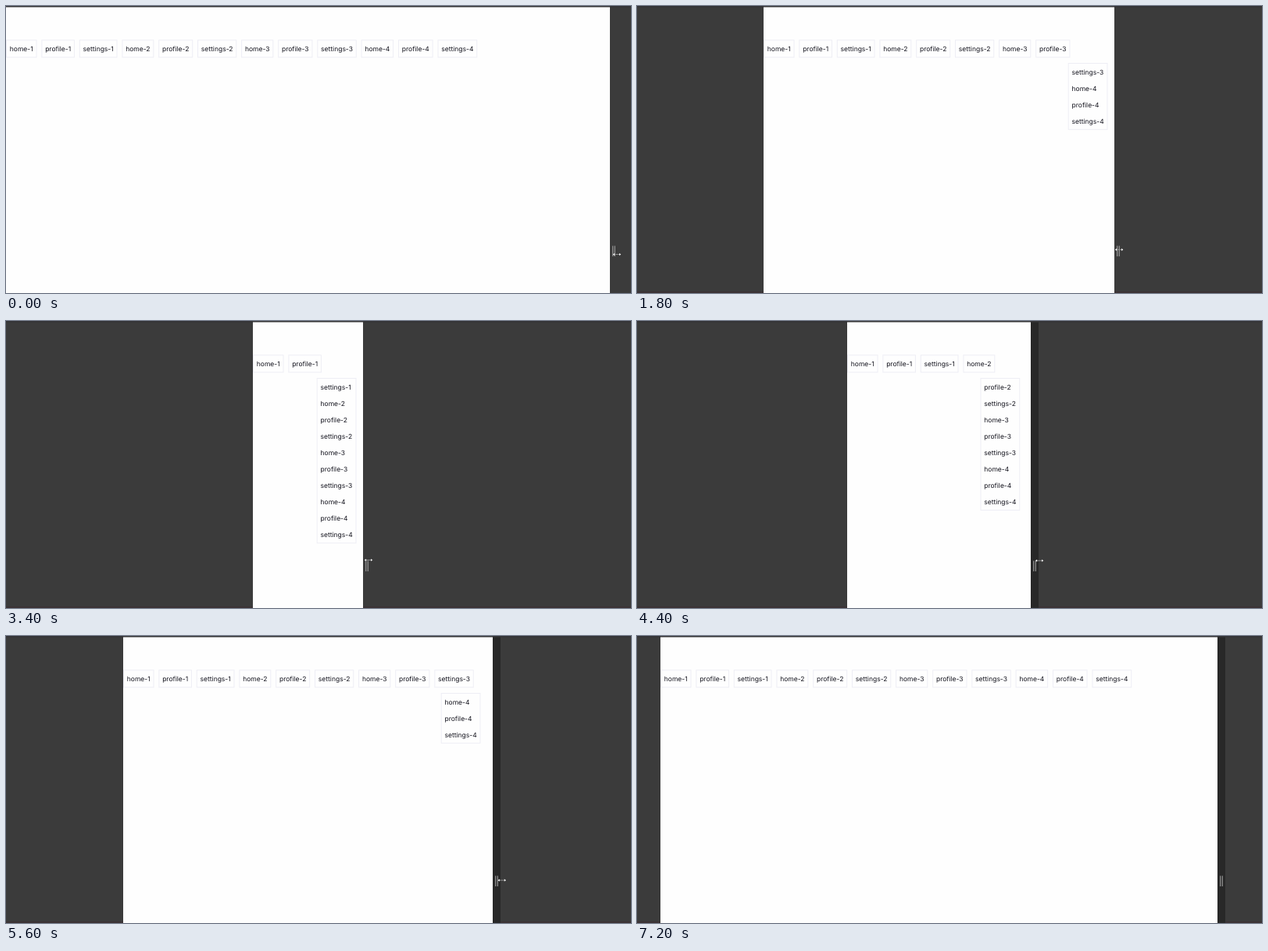
Recreate the animation shown at these times as an HTML page with a canvas. Size 800 by 368 pixels, loop 7800 ms.

```html
<!DOCTYPE html>
<html lang="en">
<head>
<meta charset="utf-8">
<title>Overflowing tab bar</title>
<style>
html, body { margin: 0; width: 100%; height: 100%; overflow: hidden; background: #3b3b3b; }
canvas { display: block; }
</style>
</head>
<body>
<canvas id="stage" width="800" height="368"></canvas>
<script>
const ctx = document.getElementById('stage').getContext('2d');
const LOOP = 7800, STEP = 100;
const CENTER = 386.5, NARROWEST = 322;
const PAD = 4.8, GAP = 5.87, ROW = 21.08, MARGIN = 8.5;

// Left edge of the panel as [time, x]; the right edge mirrors it.
const drag = [[500, 0], [1100, 79], [2400, 234], [3400, 316], [3600, NARROWEST],
  [3800, NARROWEST], [5100, 208], [6200, 79.5], [6800, 30]];

const labels = [1, 2, 3, 4].flatMap(n => ['home', 'profile', 'settings'].map(name => `${name}-${n}`));

function leftAt(t) {
  const next = drag.findIndex(([time]) => t < time);
  if (next === 0) return drag[0][1];
  if (next < 0) return drag[drag.length - 1][1];
  const [t0, a] = drag[next - 1], [t1, b] = drag[next];
  return a + (b - a) * (t - t0) / (t1 - t0);
}

function fill(color, x, y, w, h) {
  ctx.fillStyle = color;
  ctx.fillRect(x, y, w, h);
}

function box(x, y, w, h) {
  ctx.strokeStyle = '#eeeef5';
  ctx.strokeRect(x + .5, y + .5, w - 1, h - 1);
}

function label(text, x, y) {
  ctx.fillStyle = '#15151f';
  ctx.fillText(text, x, y);
}

const widthOf = text => ctx.measureText(text).width;

function drawTabs(left, right, lag) {
  let x = left, shown = 0;
  for (const text of labels) {
    const w = widthOf(text) + 2 * PAD;
    if (x + w > right - MARGIN) break;
    box(x, 43.3, w, 23);
    label(text, x + PAD, 58.2);
    x += w + GAP;
    shown++;
  }
  const rest = labels.slice(shown);
  if (!rest.length) return;
  const w = Math.max(...rest.map(widthOf)) + 2 * PAD;
  const menuX = right - MARGIN - lag - w;
  box(menuX, 73, w, rest.length * ROW + 1.5);
  rest.forEach((text, i) => label(text, menuX + PAD, 87.7 + i * ROW));
}

function drawCursor(x, y) {
  fill('#8c8c8c', x - 4, y - .5, 8, 1);
  ctx.fillStyle = '#fff';
  for (const side of [-1, 1]) {
    ctx.beginPath();
    ctx.moveTo(x + side * 5.2, y);
    ctx.lineTo(x + side * 3, y - 1.6);
    ctx.lineTo(x + side * 3, y + 1.6);
    ctx.fill();
  }
}

function draw(now) {
  const t = Math.floor(now / STEP) * STEP % LOOP;
  const x = leftAt(t), speed = x - leftAt(t - STEP);
  const left = Math.round(x), right = 2 * CENTER - left;
  const grip = right + 5;

  fill('#3b3b3b', 0, 0, 800, 368);
  fill('#333336', 0, 0, 800, 1.5);
  if (t >= 600) fill('#3b3335', 0, 366, 800, 2);
  if (t >= 3900) fill('#282828', grip - 5, 1.5, 10, 366.5);
  fill('#fefefe', left, 1.5, right - left, 366.5);

  ctx.font = '8.5px Inter, sans-serif';
  ctx.textRendering = 'geometricPrecision';
  // The menu trails behind while the panel widens.
  drawTabs(left, right, Math.max(0, -speed) * .6);

  for (const side of [-1.25, 1.25]) fill('#a6a6a6', grip + side - .5, 307.5, 1, 13.5);
  if (t < 7200) {
    const rise = (1 - Math.cos(Math.PI * x / NARROWEST)) / 2;
    drawCursor(right + 9 - speed * .24, 318.5 - 12 * rise);
  }
}

const start = performance.now();
function tick() {
  draw(performance.now() - start);
  requestAnimationFrame(tick);
}
tick();
</script>
</body>
</html>
```
